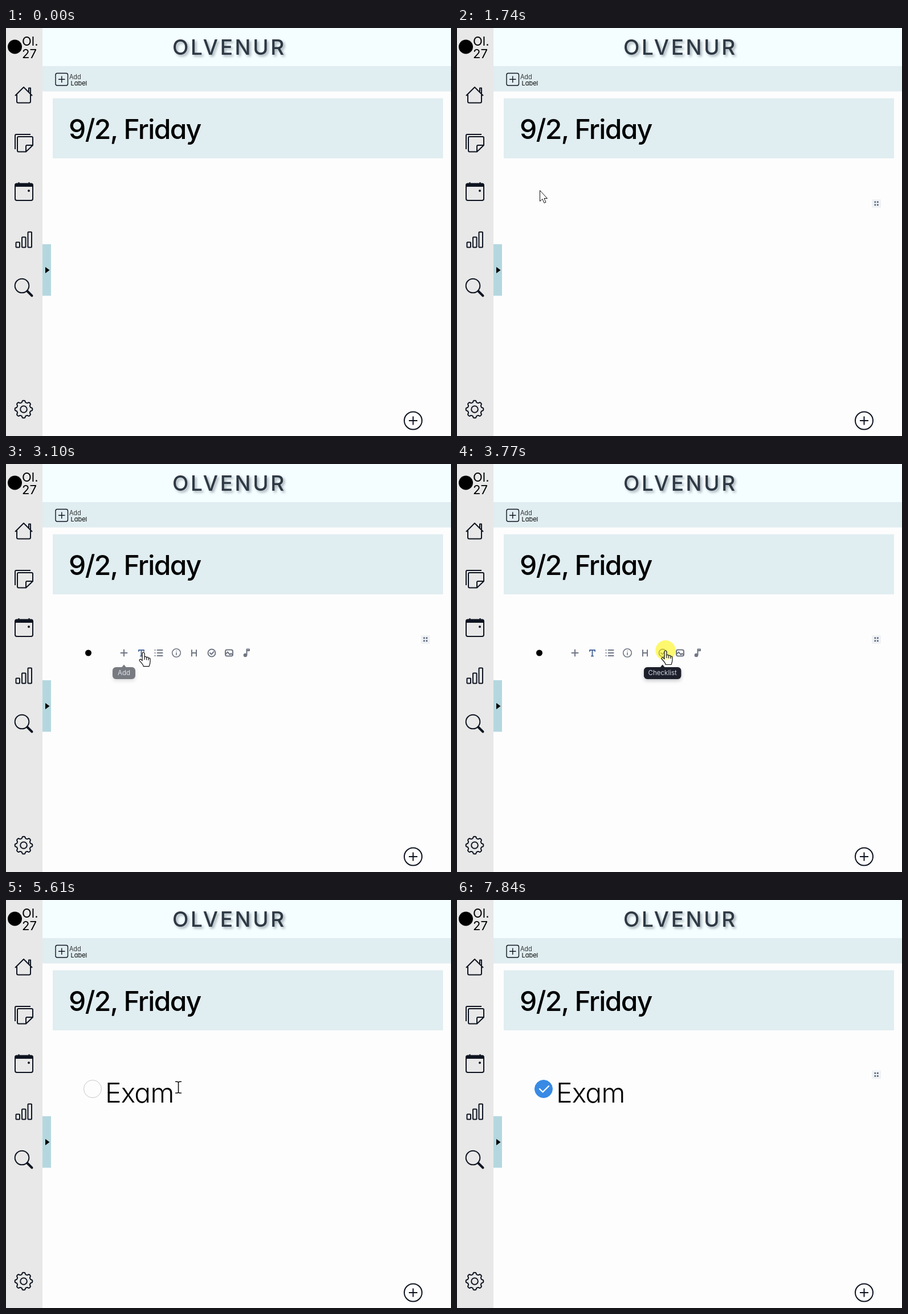
Write an HTML page that moves like this. It is 781 px wide and 717 px high and loops after 8.5 s.

```html
<!DOCTYPE html>
<html lang="en">
<head>
<meta charset="utf-8">
<title>Day notes</title>
<style>
  html, body { margin: 0; width: 100%; height: 100%; overflow: hidden; background: #fdfdfd; }
  svg { display: block; width: 781px; height: 717px; }
  text { font-family: Inter, Lato, sans-serif; font-feature-settings: "cv11"; white-space: pre; }
  .line { fill: none; stroke: #0e1420; stroke-width: 2; stroke-linejoin: round; }
  .thin { stroke-width: 1.4; }
  .tool { fill: none; stroke: #707684; stroke-width: 2; stroke-linecap: round; stroke-linejoin: round; }
  .title { font-size: 37px; font-weight: 500; letter-spacing: 3.6px; fill: #2d3844;
           filter: drop-shadow(3px 3px 2px #a3afb5); }
  .date { font-size: 48px; font-weight: 500; letter-spacing: -1.6px; }
  .entry { font-size: 48px; font-weight: 300; letter-spacing: -.8px; }
  .tip { fill: #1d202b; filter: drop-shadow(0 3px 3px rgba(29, 32, 43, .25)); }
  .tip text { font-size: 11.5px; fill: #cdd1e0; text-anchor: middle; }
</style>
</head>
<body>
<svg viewBox="0 0 781 717">
  <rect width="64" height="717" fill="#e8e8e8"/>
  <rect x="64" width="717" height="67" fill="#f4fdff"/>
  <rect x="64" y="67" width="717" height="44.5" fill="#e0edf1"/>
  <rect x="82" y="123.500" width="685" height="105.500" fill="#e0edf1"/>
  <rect x="64" y="380" width="15" height="90.500" fill="#b4d7df"/>
  <path d="M69 420v11l7.500 -5.500z"/>

  <circle cx="15.500" cy="33" r="12.500"/>
  <text x="28" y="31" font-size="22">Ol.</text>
  <text x="28" y="53" font-size="22">27</text>

  <text class="title" x="292" y="47">OLVENUR</text>
  <text class="date" x="110" y="195">9/2, Friday</text>
  <text x="111" y="90" font-size="11" font-weight="300">Add</text>
  <text x="113.500" y="101" font-size="11">Label</text>

  <g class="line" id="menu">
    <!-- home -->
    <path d="M16 119L31 104L46 119M40 112v-6.500h3v9.500M19 117v12q0 2.500 2.500 2.500h19q2.500 0 2.500 -2.500v-12"/>
    <!-- notes -->
    <path d="M16 213v-24q0 -2 2 -2h25"/>
    <path d="M22 191h23q2 0 2 2v13L35 217.500H22q-2 0 -2 -2v-22.500q0 -2 2 -2zM35 217v-9q0 -2 2 -2h10"/>
    <!-- calendar -->
    <rect x="16" y="273.500" width="31" height="29.500" rx="3"/>
    <path d="M17 275h29v3h-29zM22.500 271v3M40.500 271v3" fill="#0e1420"/>
    <circle cx="40" cy="286" r="1"/>
    <!-- search -->
    <circle cx="28" cy="453" r="12.300"/>
    <path d="M37.500 462.500l8 8" stroke-width="4" style="stroke-width:4;stroke-linecap:round"/>
    <!-- settings -->
    <path id="gear"/>
    <circle cx="31" cy="670" r="5.800"/>
    <!-- buttons -->
    <rect class="thin" x="87" y="79.500" width="21.500" height="21.500" rx="3"/>
    <circle cx="714.500" cy="690" r="15.500"/>
  </g>

  <g id="handle">
    <rect x="728" y="301" width="16" height="15" rx="1" fill="#eff2f5"/>
  </g>
  <g id="bullet" class="tool">
    <circle cx="144.500" cy="332" r="4.500" fill="#000" stroke="#000"/>
  </g>
  <g id="tools" class="tool">
    <path stroke="#4f6c9d" d="M233 329v-2h9v2M237.500 327v10.500M236 337.500h3"/>
    <g id="list"></g>
    <g stroke-width="1.600"><circle cx="299" cy="332" r="7.300"/><path d="M299 331.500v4M299 328.500h.1"/></g>
    <path d="M326 327v10.500M334 327v10.500M326 332h8"/>
    <g><circle cx="361" cy="332" r="6.500"/><path d="M358 332l2.500 2.500l4 -4.500"/></g>
    <g><rect x="385" y="326.500" width="13" height="11" rx="3"/><path d="M385.500 334l3.500 -3.500l4 4.500l2 -2l3 2.500"/></g>
    <g><path d="M422.500 335v-9.500h4.500v2.500h-4.500"/><circle cx="420" cy="336" r="2.300" fill="#707684"/></g>
  </g>
  <g id="box">
    <circle id="disc" cx="152" cy="332" r="15.500"/>
    <path id="mark" class="tool" d="M145 332l5.500 5.500l10.500 -10.500" style="stroke:#fff;stroke-width:2.400"/>
  </g>
  <text id="entry" class="entry" x="174" y="356"></text>
  <rect id="caret" width="1" height="57"/>
  <g id="tips"></g>

  <circle id="press" r="17.700" fill="#fff500" fill-opacity=".56"/>
  <g id="pointer" stroke="#111" stroke-linejoin="round">
    <path id="arrow" fill="#fff" d="M.5 .5v19l4.500 -4l3 7l3 -1.300l-3 -6.700h5.500z"/>
    <path id="beam" fill="none" stroke-width="1.600" d="M-5.500 -10h3.500l2 1l2 -1h3.500M0 -9v18M-5.500 10h3.500l2 -1l2 1h3.500"/>
    <path id="hand" fill="#fff" fill-opacity=".6" stroke-width="1.200" d="M-2 14.500v-12.500a2 2 0 0 1 4 0v7a1.750 1.750 0 0 1 3.500 0v1a1.750 1.750 0 0 1 3.500 0v1.500a1.500 1.500 0 0 1 3 0v4.500q0 3 -2 8.500h-10q0 -3 -6.500 -9.500q-1.500 -3 2 -3zM2 9v4M5.500 10v3.500M9 11.500v2.500"/>
  </g>
</svg>

<script>
const LOOP = 8500;
const BLOCK = 1760, TOOLS = 2740, CONVERT = 3850, CHECK = 6580;
const el = {};
document.querySelectorAll('[id]').forEach(n => el[n.id] = n);

// pointer moves: pow sets the ease-out, bow bends the path
const moves = [
  { from: 280, to: 1090, x: 154, y: 280, pow: 2.33 },
  { from: 1260, to: 1600, x: 145, y: 285 },
  { from: BLOCK, to: 2030, x: 156, y: 306 },
  { from: 2200, to: 2600, x: 206, y: 332, bow: 1.5 },
  { from: 3000, to: 3460, x: 366, y: 328 },
  { from: 5530, to: 6370, x: 148.5, y: 342, pow: 3.4, bow: 2 },
  { from: 6960, to: 7800, x: 697, y: 719, bow: 2 }
];
const presses = [1140, 1620, 2680, 3770, 6500];
const word = 'Exam', keys = [4400, 4610, 4660, 4820];
const wakes = [1880, CONVERT + 20, ...keys];  // restart the caret blink

const within = (t, a, b) => t >= a && t < b;
const ramp = (t, a, len) => Math.max(0, Math.min(1, (t - a) / len));
const show = (node, on) => node.setAttribute('visibility', on ? 'visible' : 'hidden');
const put = (node, x, y) => node.setAttribute('transform', `translate(${x} ${y})`);
const add = (node, markup) => node.insertAdjacentHTML('beforeend', markup);

function plus(node, x, y, r, cls = '') {
  add(node, `<path class="${cls}" d="M${x - r} ${y}h${2 * r}M${x} ${y - r}v${2 * r}"/>`);
}

function tip(x, w, label) {
  add(el.tips, `<g class="tip"><path d="M${x - 4} 357.5l4 -5l4 5z"/>
    <rect x="${x - w / 2}" y="357" width="${w}" height="21" rx="6"/>
    <text x="${x}" y="371">${label}</text></g>`);
  return el.tips.lastElementChild;
}

function gearPath(cx, cy, teeth) {
  const points = Array.from({ length: 160 }, (_, i) => {
    const a = i / 80 * Math.PI;
    const r = 13.8 + 1.6 * Math.tanh(2 * Math.cos(teeth * a));
    return `${cx + r * Math.cos(a)} ${cy + r * Math.sin(a)}`;
  });
  return `M${points.join('L')}Z`;
}

function build() {
  el.gear.setAttribute('d', gearPath(31, 670, 8));
  plus(el.menu, 97.75, 90.25, 5.75, 'thin');
  plus(el.menu, 714.5, 690, 7.5);
  plus(el.bullet, 207, 332, 5.5);
  for (let i = 0; i < 3; i++) {
    const h = 9 * (i + 1);
    add(el.menu, `<rect x="${17.5 + 10.5 * i}" y="${385.5 - h}" width="6.5" height="${h}" rx="1"/>`);
    add(el.list, `<path d="M261.5 ${327 + 5 * i}h.1m4 0h9"/>`);
  }
  for (let i = 0; i < 4; i++) {
    add(el.handle, `<rect x="${732.5 + 4.5 * (i % 2)}" y="${304.5 + 5 * (i >> 1)}" width="2.7" height="2.7" fill="#566178"/>`);
  }
}

function position(t) {
  let x = 735, y = 705;
  for (const { from, to, x: tx, y: ty, pow = 1, bow = 1 } of moves) {
    if (t < from) break;
    const k = 1 - (1 - ramp(t, from, to - from)) ** pow;
    x += (tx - x) * k;
    y += (ty - y) * k ** bow;
  }
  return [x, y];
}

// the pointer takes its shape from what lies under it
function pointerShape(t, x, y) {
  if (!within(t, 280, 7800)) return '';
  if (t < BLOCK) return 'arrow';
  if (t < CONVERT ? x > 195 : x < 168) return 'hand';
  return y < 368 ? 'beam' : 'arrow';
}

function draw(t) {
  const [x, y] = position(t);
  const shape = pointerShape(t, x, y);
  put(el.pointer, x, y);
  for (const s of ['arrow', 'beam', 'hand']) show(el[s], s === shape);
  put(el.press, x, y - 0.5);
  show(el.press, presses.some(p => within(t, p, p + 80)));

  show(el.handle, within(t, 1200, CONVERT) || t >= CHECK);
  put(el.handle, 0, t < CONVERT ? 0 : -1.5);
  show(el.bullet, within(t, BLOCK, CONVERT));
  show(el.tools, within(t, TOOLS, CONVERT));
  [...el.tools.children].forEach((n, i) => { n.style.opacity = ramp(t, TOOLS + i * 20, 120); });
  addTip.style.opacity = ramp(t, 2600, 100) - ramp(t, 3060, 100);
  listTip.style.opacity = ramp(t, 3360, 100) - ramp(t, 4050, 50);

  const checked = t >= CHECK;
  const blue = shape === 'hand' ? '#2f79d2' : '#388ae5';
  show(el.box, t >= CONVERT);
  show(el.mark, checked);
  el.disc.setAttribute('fill', checked ? blue : '#fdfdfd');
  el.disc.setAttribute('stroke', checked ? blue : '#c9c9cb');

  const typed = keys.filter(k => k <= t).length;
  el.entry.textContent = word.slice(0, typed);
  const wake = wakes.filter(w => w <= t).pop();
  const focused = within(t, BLOCK, 2600) || within(t, CONVERT, 6500);
  show(el.caret, focused && Math.floor((t - wake) / 500) % 2 === 0);
  if (t < CONVERT) put(el.caret, 157, 304);
  else put(el.caret, 173 + (typed ? el.entry.getComputedTextLength() : 0), 310);
}

build();
const addTip = tip(207, 40, 'Add');
const listTip = tip(360.7, 65.5, 'Checklist');
const start = performance.now();
function tick() {
  draw((performance.now() - start) % LOOP);
  requestAnimationFrame(tick);
}
tick();
</script>
</body>
</html>
```
